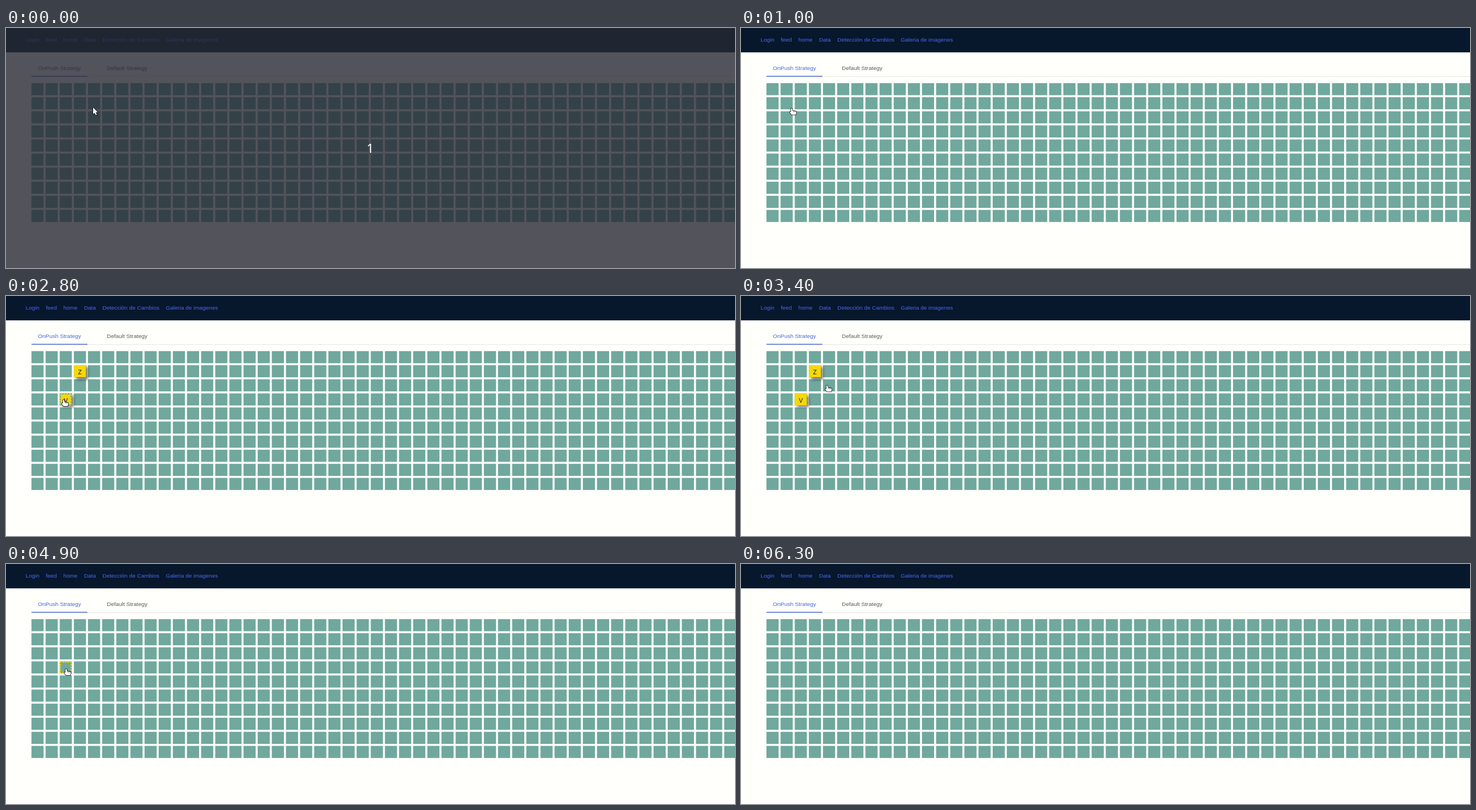
Animation of 1280 by 423 pixels, one loop 6.7 s. Source, as an HTML page with a canvas:

```html
<!DOCTYPE html>
<html lang="es">
<head>
<meta charset="utf-8">
<style>
html, body { margin: 0; height: 100%; overflow: hidden; background: #fffffb; }
canvas { display: block; }
</style>
</head>
<body>
<canvas id="stage" width="1280" height="423"></canvas>
<script>
const ctx = document.getElementById('stage').getContext('2d');
const LOOP = 6700, STEP = 100;
const ZOOM = .7093; // the page is laid out in its own pixels, then scaled
const LEFT = 63, TOP = 137, PITCH = 35, SIZE = 30;
const TEAL = '#70a89d', YELLOW = '#f6d809';
const SANS = 'px "Liberation Sans", Arial, sans-serif';
const LINKS = ['Login', 'feed', 'home', 'Data', 'Detección de Cambios', 'Galeria de imagenes'];

// Cells that are clicked on and off again
const tiles = [
  { col: 3, row: 1, letter: 'Z', on: 1800, off: 4000 },
  { col: 2, row: 3, letter: 'V', on: 2800, off: 4900 }
];

// Pointer glides: start, end, goal, and a point that bends the way there
const home = [153, 140];
const glides = [
  { from: 200, to: 600, goal: [60, 67], bend: [163, 107] },
  { from: 700, to: 1400, goal: [137, 146], bend: [90, 190] },
  { from: 1600, to: 2300, goal: [95, 191], bend: [136, 93] },
  { from: 2300, to: 2500, goal: [101, 183] },
  { from: 2800, to: 3200, goal: [166, 182], bend: [232, 255] },
  { from: 3300, to: 3500, goal: [136, 133] },
  { from: 4000, to: 4700, goal: [105.5, 185] },
  { from: 5100, to: 5300, goal: [139, 158] },
  { from: 5400, to: 5500, goal: [124, 117] },
  { from: 5600, to: 6300, goal: [85, -20], bend: [40, 320] }
];

const hand = new Path2D('M-1.3 .8Q0-.9 1.3.8L1.6 4 6.8 4.9Q8.6 5.3 8.4 7L7.5 11H0L-3.2 7.2Q-3 5.2-1.1 6.3Z');
const knuckles = new Path2D('M3.3 4.6V6.4M5.5 5V6.6');
const arrow = new Path2D('M0 0V11.8L2.6 9.4 4.6 13.6 6.4 12.8 4.6 8.6H8Z');

function rect(x, y, w, h, color) {
  ctx.fillStyle = color;
  ctx.fillRect(x, y, w, h);
}

function text(str, x, y, color, font, align = 'left') {
  ctx.font = font;
  ctx.textAlign = align;
  ctx.fillStyle = color;
  ctx.fillText(str, x, y);
}

function pointerAt(t) {
  let pos = home;
  for (const { from, to, goal, bend } of glides) {
    if (t <= from || t < 300) break;
    const k = Math.min(1, (t - from) / (to - from));
    pos = pos.map((a, i) => {
      const mid = bend ? bend[i] : (a + goal[i]) / 2;
      return (1 - k) ** 2 * a + 2 * k * (1 - k) * mid + k * k * goal[i];
    });
  }
  return pos;
}

// Cell under a stage point, if any
function cellAt(x, y) {
  const u = (x / ZOOM - LEFT) / PITCH, v = (y / ZOOM - TOP) / PITCH;
  const edge = SIZE / PITCH;
  if (u < 0 || v < 0 || u % 1 > edge || v % 1 > edge) return null;
  return { col: Math.floor(u), row: Math.floor(v) };
}

function drawPage() {
  rect(0, 0, 1805, 600, '#fffffb');
  rect(0, 0, 1805, 60.5, '#07172c');
  let x = 48.5;
  for (const link of LINKS) {
    text(link, x, 34, '#4a69ee', 14 + SANS);
    x += ctx.measureText(link).width + 16;
  }
  text('OnPush Strategy', 79, 104, '#4668d4', 14 + SANS);
  text('Default Strategy', 249.5, 104, '#595959', 14 + SANS);
  rect(LEFT, 120, 1805, 1, '#deded9');
  rect(LEFT, 119, 138.5, 2, '#4467cf');
  for (let row = 0; row < 10; row++)
    for (let col = 0; col < 50; col++)
      rect(LEFT + col * PITCH, TOP + row * PITCH, SIZE, SIZE, TEAL);
}

function drawTile({ col, row, letter, on, off }, t, hover) {
  const x = LEFT + col * PITCH, y = TOP + row * PITCH;
  const lit = t >= on && t < off;
  if (lit) {
    ctx.save();
    ctx.shadowColor = 'rgba(0,0,0,.6)';
    ctx.shadowOffsetX = ctx.shadowOffsetY = 3.5;
    ctx.shadowBlur = 5;
    rect(x, y, SIZE, SIZE, YELLOW);
    ctx.restore();
    text(letter, x + SIZE / 2, y + 23, '#111', 15 + SANS, 'center');
  }
  // A fresh click leaves a dashed border while the pointer stays
  const fresh = [on, off].some(click => t >= click && t < click + 400);
  if (fresh && hover && hover.col === col && hover.row === row) {
    ctx.strokeStyle = lit ? TEAL : YELLOW;
    ctx.lineWidth = 3;
    ctx.setLineDash([4.2, 2.55]);
    ctx.lineDashOffset = 2.1;
    ctx.strokeRect(x + 1.5, y + 1.5, SIZE - 3, SIZE - 3);
    ctx.setLineDash([]);
  }
}

function drawOverlay() {
  rect(0, 0, 1280, 423, 'rgba(39,41,52,.8)');
  text('1', 639.5, 219.5, '#fff', '22px "Noto Sans", "Open Sans", sans-serif', 'center');
}

function drawPointer(x, y, isHand) {
  const shape = isHand ? hand : arrow;
  ctx.save();
  ctx.translate(x, y);
  ctx.lineJoin = 'round';
  ctx.lineWidth = 1.6;
  ctx.strokeStyle = '#111';
  ctx.fillStyle = '#fff';
  ctx.stroke(shape);
  ctx.fill(shape);
  if (isHand) {
    ctx.lineWidth = .7;
    ctx.stroke(knuckles);
  }
  ctx.restore();
}

const start = performance.now();

function draw() {
  const now = (performance.now() - start) % LOOP;
  const t = Math.floor(now / STEP) * STEP;
  const dimmed = t < 300;
  const [x, y] = pointerAt(t);
  const hover = cellAt(x, y);
  const onTab = x > 44 && x < 143 && y > 56 && y < 86;

  ctx.save();
  ctx.scale(ZOOM, ZOOM);
  drawPage();
  for (const tile of tiles) drawTile(tile, t, hover);
  ctx.restore();
  if (dimmed) drawOverlay();
  drawPointer(x, y, !dimmed && (hover || onTab));
  requestAnimationFrame(draw);
}
draw();
</script>
</body>
</html>
```
